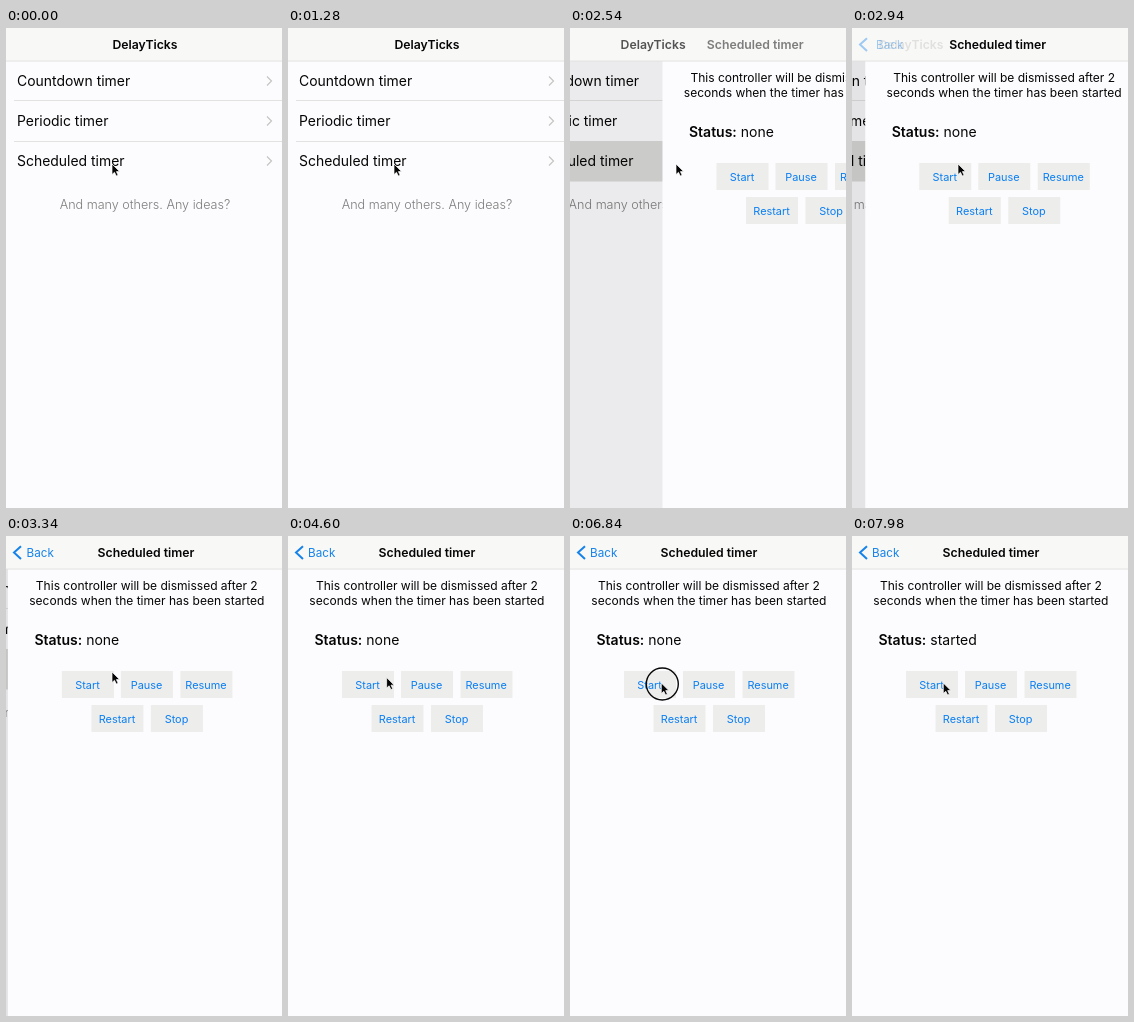
An HTML page for the animation above (8000 ms loop, 276 px wide and 480 px high).

```html
<!DOCTYPE html>
<html lang="en">
<head>
<meta charset="utf-8">
<title>Timer demo</title>
<style>
  html, body { margin: 0; width: 100%; height: 100%; overflow: hidden; background: #fcfcfe; }
  svg { display: block; width: 100%; height: 100%; font-family: Inter, Roboto, sans-serif; fill: #050505; }
  .row { font-size: 13.95px; }
  .hint { font-size: 12.6px; font-weight: 300; fill: #7c7c7c; }
  .title { font-size: 12.25px; font-weight: 600; }
  .info { font-size: 12.03px; }
  .status { font-size: 14px; }
  .bold { font-weight: 600; }
  .button { font-size: 10.9px; fill: #0b7ff2; }
  .mid { text-anchor: middle; }
  .line { fill: none; stroke: #e2e2e0; }
  .chevron { fill: none; stroke: #c4c4c2; stroke-width: 1.2; }
</style>
</head>
<body>
<svg viewBox="0 0 276 480">
  <g id="list">
    <rect width="276" height="480" fill="#fcfcfe"/>
    <path class="line" d="M8 72.5H276M8 113.5H276"/>
    <rect id="highlight" y="113" width="276" height="40.5" fill="#d9d9d8"/>
    <g id="rows"></g>
    <text class="hint mid" x="139" y="181">And many others. Any ideas?</text>
  </g>
  <rect id="dim" width="276" height="480" fill="#000"/>
  <g id="page">
    <rect width="276" height="480" fill="#fcfcfe"/>
    <g class="info mid">
      <text x="138.9" y="54">This controller will be dismissed after 2</text>
      <text x="138.9" y="69">seconds when the timer has been started</text>
    </g>
    <text class="status" x="26.5" y="109"><tspan class="bold">Status:</tspan> <tspan id="state">none</tspan></text>
    <g id="buttons"></g>
  </g>
  <g id="nav">
    <rect width="276" height="33" fill="#f8f8f7"/>
    <path class="line" d="M0 33H276"/>
    <path id="arrow" d="M15 10.2L8 16.6L15 23" fill="none" stroke="#1683ea" stroke-width="2"/>
    <text id="back" x="20" y="20.8" font-size="11.7" fill="#1683ea">Back</text>
    <text id="oldTitle" class="title mid" x="139" y="21">DelayTicks</text>
    <text id="newTitle" class="title mid" x="139" y="21">Scheduled timer</text>
  </g>
  <g id="cursor">
    <circle id="ring" cx="1" cy="1" r="16" fill="none" stroke="#080808" stroke-width="1.4"/>
    <path d="M0 0V10.5L2.5 8.3L4.3 12L6.1 11.2L4.4 7.6H7.6Z" stroke="#fff" stroke-width=".7"/>
  </g>
</svg>
<script>
const LOOP = 8000, WIDTH = 276;
const PUSH_START = 2316, PUSH_RATE = 0.00486;
const $ = id => document.getElementById(id);
const clamp = v => Math.max(0, Math.min(1, v));
const ramp = (t, start, length) => clamp((t - start) / length);
const within = (t, start, end) => t >= start && t < end;
const mix = (a, b, k) => a + (b - a) * k;
const move = (id, x, y = 0) => $(id).setAttribute('transform', `translate(${x} ${y})`);
const fade = (id, value) => $(id).setAttribute('opacity', value);

$('rows').innerHTML = ['Countdown', 'Periodic', 'Scheduled'].map((name, i) => {
  const y = 53 + 40 * i;
  return `<text class="row" x="11" y="${y + 5}">${name} timer</text>
    <path class="chevron" d="M261 ${y - 4.5}l4.5 4.5l-4.5 4.5"/>`;
}).join('');

$('buttons').innerHTML = [
  ['Start', 54, 135], ['Pause', 113, 135], ['Resume', 172.5, 135],
  ['Restart', 83.5, 169], ['Stop', 143, 169]
].map(([label, x, y]) => `<rect x="${x}" y="${y}" width="52" height="27" fill="#ededec"/>
  <text class="button mid" x="${x + 25.6}" y="${y + 17.6}">${label}</text>`).join('');

function draw(t) {
  const pushing = t >= PUSH_START;
  const remaining = pushing ? Math.exp(-PUSH_RATE * (t - PUSH_START)) : 1;
  const offset = remaining < 0.002 ? 0 : remaining * WIDTH;
  const progress = 1 - remaining;

  // The list slides at a third of the speed beneath the incoming page.
  move('list', -0.3 * WIDTH * progress);
  fade('dim', 0.1 * progress);
  move('page', offset);
  fade('highlight', t >= 2150 ? 1 : 0);

  move('oldTitle', -84 * progress);
  fade('oldTitle', 1 - ramp(t, PUSH_START, 690));
  move('newTitle', offset / 2);
  fade('newTitle', ramp(t, PUSH_START, 450));
  move('back', 84 * remaining);
  fade('back', ramp(t, 2700, 600));
  fade('arrow', ramp(t, 2700, 600));

  const k = ramp(t, 4300, 600), ease = k * k * (3 - 2 * k);
  move('cursor', mix(106, 91.3, ease), mix(136, 147, ease));
  fade('ring', within(t, 2050, 2190) || within(t, 6740, 6960) ? 1 : 0);
  $('state').textContent = t >= 6960 ? 'started' : 'none';
}

const origin = performance.now();
function tick() {
  draw((performance.now() - origin) % LOOP);
  requestAnimationFrame(tick);
}
tick();
</script>
</body>
</html>
```
